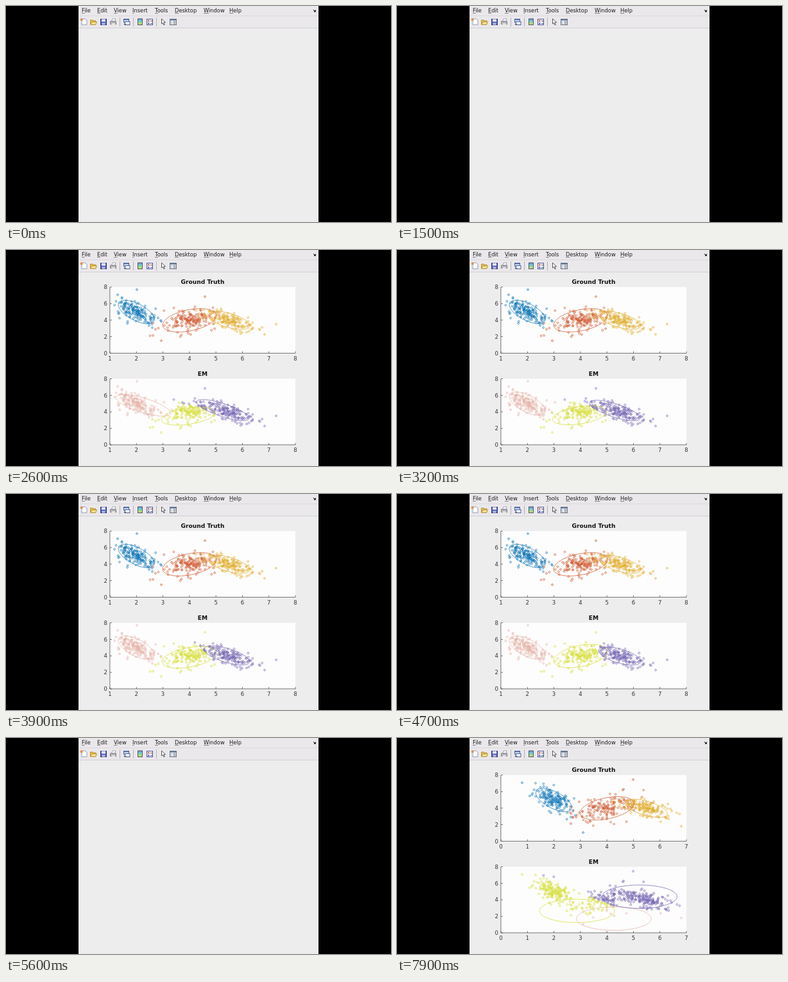
Animation of 600 by 338 pixels, one loop 8 s. Source, as an HTML page with a canvas:

```html
<!DOCTYPE html>
<html lang="en">
<head>
<meta charset="utf-8">
<style>
html, body { margin: 0; width: 100%; height: 100%; overflow: hidden; background: #000; }
canvas { display: block; width: 600px; height: 338px; }
</style>
</head>
<body>
<canvas id="stage"></canvas>
<script>
const canvas = document.getElementById('stage');
const c = canvas.getContext('2d');
const dpr = window.devicePixelRatio || 1;
canvas.width = 600 * dpr;
canvas.height = 338 * dpr;

const LOOP = 8000, STEP = 100;
const LEFT = 162, TOP = 58, WIDTH = 289, HEIGHT = 103.5, GAP = 143.5;
const UNIT = WIDTH / 7;
const FONT = '"DejaVu Sans", Verdana, sans-serif';
const TRUE_COLORS = ['#1478b8', '#d05a30', '#e2ae30'];
const EM_COLORS = ['#e6b4aa', '#d6de38', '#7868b4'];

// Gaussians as [centre x, centre y, half width, half height, correlation] in pixels
const truth = [[203, 97, 28, 18.3, .62], [286, 110, 42, 18.3, -.4], [347, 110, 33, 14.2, .6]];
const shifted = (gaussians, dx, dy) => gaussians.map(([x, y, ...rest]) => [x + dx, y + dy, ...rest]);
const round = (x, y) => [x, y, UNIT * Math.SQRT2, HEIGHT / 8 * Math.SQRT2, 0];

const start = [round(226, 262), round(296, 277), round(352, 244)];
const rough = [[214, 243, 42.5, 17, .72], [284, 260, 42, 14, -.4], [338, 250.5, 41, 16.5, .77]];
const settled = shifted(truth, 0, GAP);
const settleTime = [600, 2100, 2100];
const secondStart = [round(338, 282.7), round(280.5, 270.5), round(378, 248.3)];

function random(seed) {
  return () => {
    seed = (seed + 0x6d2b79f5) | 0;
    let r = Math.imul(seed ^ (seed >>> 15), 1 | seed);
    r = (r + Math.imul(r ^ (r >>> 7), 61 | r)) ^ r;
    return ((r ^ (r >>> 14)) >>> 0) / 4294967296;
  };
}

function place([x, y, w, h, rho], r, angle) {
  const u = r * Math.cos(angle), v = r * Math.sin(angle);
  return [x + w * u, y + h * (rho * u + Math.sqrt(1 - rho * rho) * v)];
}

// Dense core with a thin tail, plus a few far points per cluster
function sample(seed, gaussians, far) {
  const rnd = random(seed);
  return gaussians.map((g, i) => {
    const points = [...far[i]];
    while (points.length < 165) {
      const r = .8 * (-Math.log(1 - rnd())) ** .58;
      const angle = rnd() * 2 * Math.PI;
      if (r < 1.75) points.push(place(g, r, angle));
    }
    return points;
  });
}

const truthB = shifted(truth, UNIT, 0);
const runA = {
  first: 1, truth,
  clusters: sample(11, truth, [[[204, 62], [174, 70]], [[310, 73], [242, 142]], [[421, 116], [403, 132]]])
};
const runB = {
  first: 0, truth: truthB,
  clusters: sample(42, truthB, [[[195, 70], [290, 148]], [[368, 65], [271, 134]], [[443, 138], [411, 131]]])
};

const clamp = k => Math.min(1, Math.max(0, k));
const smooth = k => k * k * (3 - 2 * k);
const mix = (a, b, k) => a.map((v, i) => v + (b[i] - v) * k);

// A quick jump to a rough fit, then each cluster settles at its own pace
function fitAt(t) {
  const quick = 1 - (1 - clamp(t / 300)) ** 1.5;
  return start.map((g, i) =>
    mix(mix(g, rough[i], quick), settled[i], smooth(clamp((t - 300) / settleTime[i]))));
}

function score([x, y], [cx, cy, w, h, rho]) {
  const u = (x - cx) / w, v = (y - cy) / h, s = 1 - rho * rho;
  return -(u * u - 2 * rho * u * v + v * v) / s - Math.log(w * h * Math.sqrt(s));
}

function regroup(clusters, fit) {
  const groups = fit.map(() => []);
  for (const [x, y] of clusters.flat()) {
    const p = [x, y + GAP];
    const scores = fit.map(g => score(p, g));
    groups[scores.indexOf(Math.max(...scores))].push(p);
  }
  return groups;
}

function rect(x, y, w, h, fill) {
  c.fillStyle = fill;
  c.fillRect(x, y, w, h);
}

function box(x, y, w, h, fill, stroke) {
  rect(x, y, w, h, stroke);
  rect(x + 1, y + 1, w - 2, h - 2, fill);
}

function shape(coords, fill, stroke) {
  c.beginPath();
  for (let i = 0; i < coords.length; i += 2) c.lineTo(coords[i], coords[i + 1]);
  c.closePath();
  c.fillStyle = fill;
  c.fill();
  c.strokeStyle = stroke;
  c.lineWidth = .8;
  c.stroke();
}

function text(s, x, y, font, align = 'left', color = '#222') {
  c.font = font + ' ' + FONT;
  c.textAlign = align;
  c.fillStyle = color;
  c.fillText(s, x, y);
}

function drawMenu() {
  const items = { File: 118, Edit: 142, View: 168, Insert: 197, Tools: 232, Desktop: 263, Window: 308, Help: 348 };
  for (const [name, x] of Object.entries(items)) {
    text(name, x, 10.2, '8.3px', 'left', '#1a1a1a');
    rect(x, 11.2, c.measureText(name[0]).width, .6, '#444');
  }
  shape([479, 6, 482, 8.5], '#111', '#111');
  shape([482.5, 6.5, 482.5, 9, 480, 9], '#111', '#111');
}

function drawToolbar() {
  // new, open, save, print
  shape([118, 20, 123.5, 20, 126, 22.5, 126, 29.4, 118, 29.4], '#fafcff', '#7a8ca6');
  rect(116, 19.5, 3.5, 3.5, '#e98a4a');
  shape([131.5, 29, 131.5, 22, 135, 22, 136, 23, 140, 23, 140, 29], '#e8bd48', '#a88228');
  shape([131.5, 29, 134, 25, 141.5, 25, 139.5, 29], '#ffe795', '#a88228');
  box(147, 20, 10, 10, '#5363c0', '#30397c');
  rect(149, 20.5, 6, 4, '#e6ebfa');
  rect(149.5, 26.5, 5, 3, '#b9c2df');
  shape([164.5, 24, 166, 20, 171, 20, 170, 24], '#fff', '#8994a0');
  shape([162.5, 24, 171.5, 24, 171.5, 28.5, 162.5, 28.5], '#b4b5ba', '#707078');
  rect(164.5, 27, 5.5, 2.7, '#e4e4e0');
  // link, colorbar, legend
  box(183, 20, 9, 6, '#dce7f7', '#486092');
  rect(184, 21, 7, 1.4, '#6686be');
  box(185, 24, 8.5, 6, '#eef3fa', '#486092');
  shape([184, 28, 184, 29, 187, 29], '#59616e', '#59616e');
  const ramp = c.createLinearGradient(0, 20, 0, 30);
  ['#7184d5', '#69cbd0', '#a9d785', '#f0d568'].forEach((col, i) => ramp.addColorStop(i / 3, col));
  box(205, 19.5, 8, 10.5, ramp, '#505864');
  box(219, 20, 10, 10, '#f6f7fc', '#4a558e');
  [['#d75d50', 22], ['#596bd0', 26]].forEach(([color, y]) => {
    rect(221, y, 2.5, 2.5, color);
    rect(225, y + 1, 3, 1, '#555');
  });
  // pointer, inspector
  shape([242.5, 20, 242.5, 28, 244.5, 26.3, 246, 29.8, 247.3, 29.2, 245.9, 25.8, 248.5, 25.6], '#fff', '#333');
  box(255, 20, 11, 10, '#f4f5f7', '#6d7580');
  rect(256, 21, 9, 1.5, '#5272a5');
  rect(256, 23, 3, 6, '#c9d5e8');
  for (let y = 23.5; y < 29; y += 2) rect(260.5, y, 4, 1, '#777');
  for (const x of [177, 198, 234]) rect(x, 18, 1, 14, '#b4b2b6');
}

function drawWindow() {
  rect(0, 0, 600, 338, '#000');
  rect(113, 0, 374, 338, '#ededed');
  rect(113, 0, 374, 35, '#ebe8ec');
  rect(113, 15, 374, 1, '#dddadf');
  rect(113, 34, 374, 1, '#d2d0d4');
  drawMenu();
  drawToolbar();
}

function drawAxes(title, dy, first) {
  const top = TOP + dy, bottom = top + HEIGHT, ink = '#555';
  rect(LEFT, top, WIDTH, HEIGHT, '#fdfdfd');
  text(title, LEFT + WIDTH / 2, top - 4.7, 'bold 9.1px', 'center', '#111');
  rect(LEFT - .5, top, .8, HEIGHT, ink);
  rect(LEFT, bottom - .5, WIDTH, .8, ink);
  for (let i = 0; i <= 7; i++) {
    const x = LEFT + i * UNIT;
    rect(x - .4, bottom - 3, .8, 3, ink);
    text(first + i, x, bottom + 11.2, '8.5px', 'center', '#333');
  }
  for (let v = 0; v <= 8; v += 2) {
    const y = bottom - v * HEIGHT / 8;
    rect(LEFT, y - .4, 3, .8, ink);
    text(v, LEFT - 4, y + 3.2, '8.5px', 'right', '#333');
  }
}

function drawClusters(groups, gaussians, colors) {
  c.lineWidth = .75;
  groups.forEach((points, i) => {
    c.strokeStyle = colors[i];
    c.beginPath();
    for (const [x, y] of points) {
      c.moveTo(x + 1.4, y);
      c.arc(x, y, 1.4, 0, 2 * Math.PI);
    }
    c.stroke();
  });
  gaussians.forEach((g, i) => {
    c.strokeStyle = colors[i];
    c.beginPath();
    for (let k = 0; k < 72; k++) c.lineTo(...place(g, 1, k * Math.PI / 36));
    c.closePath();
    c.stroke();
  });
}

function drawPlots(run, fit) {
  drawAxes('Ground Truth', 0, run.first);
  drawClusters(run.clusters, run.truth, TRUE_COLORS);
  drawAxes('EM', GAP, run.first);
  drawClusters(regroup(run.clusters, fit), fit, EM_COLORS);
}

function frame() {
  const t = Math.floor(performance.now() % LOOP / STEP) * STEP;
  c.setTransform(dpr, 0, 0, dpr, 0, 0);
  drawWindow();
  if (t >= 2300 && t < 5000) drawPlots(runA, fitAt(t - 2300));
  if (t >= 7900) drawPlots(runB, secondStart);
  requestAnimationFrame(frame);
}
frame();
</script>
</body>
</html>
```
